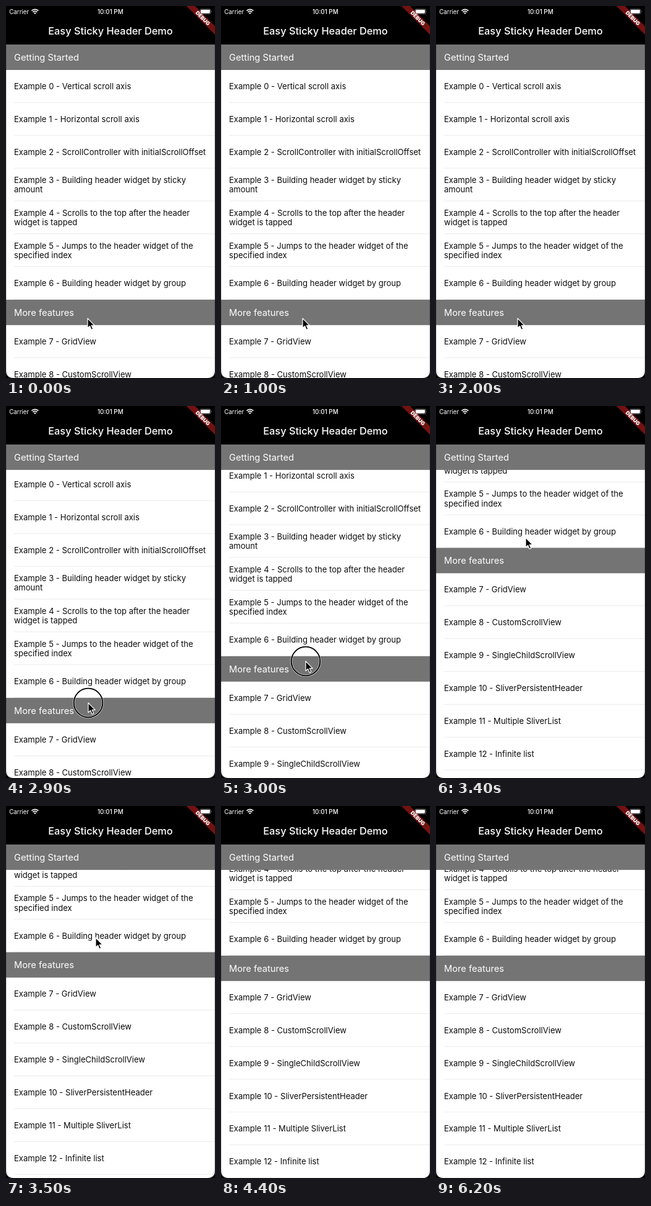
Animation of 338x599 px, one loop 6.3 s. Source, as an HTML page:

```html
<!DOCTYPE html>
<html lang="en">
<head>
<meta charset="utf-8">
<title>Easy Sticky Header Demo</title>
<style>
  html, body { margin: 0; width: 100%; height: 100%; overflow: hidden; background: #000; }
  svg { display: block; width: 338px; height: 599px; }
  text { font-family: Inter, Roboto, sans-serif; white-space: pre; }
  .item { font-size: 13.06px; fill: #0c0c0c; }
  .head { font-size: 14.7px; fill: #fff; }
  .status { font-size: 9.8px; fill: #fff; }
</style>
</head>
<body>
<svg viewBox="0 0 338 599">
  <defs>
    <clipPath id="screen"><path d="M0 0H338V586.5Q338 599 325.5 599H12.5Q0 599 0 586.5Z"/></clipPath>
  </defs>
  <rect width="338" height="599" fill="#000"/>
  <g clip-path="url(#screen)">
    <rect y="62" width="338" height="537" fill="#fff"/>
    <g id="list"></g>
    <g id="sticky"></g>
    <path d="M.3 62V599M337.6 62V599" stroke="#000" stroke-opacity=".3" stroke-width=".8"/>
    <rect width="338" height="62" fill="#000"/>
  </g>

  <text x="169" y="45.9" text-anchor="middle" font-size="16.33" font-weight="500" fill="#fff">Easy Sticky Header Demo</text>

  <g transform="translate(338 0) rotate(45)">
    <rect x="-32.7" y="22.9" width="65.4" height="9.8" fill="#731212"/>
    <text y="30.8" text-anchor="middle" font-size="8.33" font-weight="900" fill="#fff">DEBUG</text>
  </g>

  <text class="status" x="5.2" y="12.6">Carrier</text>
  <text class="status" x="168.8" y="12.6" text-anchor="middle" font-weight="500">10:01 PM</text>
  <g fill="none" stroke="#fff" stroke-width="1.6">
    <path d="M41.4 7.7Q46.9 2.9 52.4 7.7M43.4 9.9Q46.9 6.9 50.4 9.9"/>
    <path d="M45.1 11.3Q46.9 9.8 48.7 11.3L46.9 13.2Z" fill="#fff" stroke="none"/>
  </g>
  <rect x="313.6" y="4.9" width="17.4" height="8" rx="2.1" fill="none" stroke="#fff" stroke-opacity=".5" stroke-width=".8"/>
  <rect x="314.8" y="6.1" width="15" height="5.6" rx="1.1" fill="#fff"/>
  <path d="M332.1 7.5Q333.4 8.9 332.1 10.3Z" fill="#fff" fill-opacity=".6"/>

  <g id="pointer">
    <g id="ring" fill="none">
      <circle r="23.3" stroke="#fff" stroke-opacity=".6" stroke-width="3.4"/>
      <circle r="23.3" stroke="#000" stroke-width="1.8"/>
    </g>
    <path d="M0 0V15.6L3.6 12.3L6.1 18.2L8.7 17.1L6.2 11.3H11.2Z" fill="#000" stroke="#fff" stroke-width="1.2" stroke-linejoin="round"/>
  </g>
</svg>
<script>
const LOOP = 6300, STEP = 100;
const TOP = 62, HEAD_H = 40.9, ROW_H = 52.86, MAX_SCROLL = 232;

const sections = [
  ["Getting Started", [
    "Vertical scroll axis",
    "Horizontal scroll axis",
    "ScrollController with initialScrollOffset",
    "Building header widget by sticky|amount",
    "Scrolls to the top after the header|widget is tapped",
    "Jumps to the header widget of the|specified index",
    "Building header widget by group"]],
  ["More features", [
    "GridView",
    "CustomScrollView",
    "SingleChildScrollView",
    "SliverPersistentHeader",
    "Multiple SliverList",
    "Infinite list"]]
];

const $ = id => document.getElementById(id);
const list = $("list"), pointer = $("pointer"), ring = $("ring");

function add(parent, tag, attrs, text = "") {
  const node = document.createElementNS("http://www.w3.org/2000/svg", tag);
  for (const key in attrs) node.setAttribute(key, attrs[key]);
  node.textContent = text;
  parent.append(node);
}

function addHeader(parent, y, title) {
  add(parent, "rect", { x: 0, y, width: 338, height: HEAD_H, fill: "#747474" });
  add(parent, "text", { class: "head", x: 13, y: y + 26 }, title);
}

function addRow(y, label) {
  const lines = label.split("|");
  lines.forEach((line, i) => {
    const shift = (i - (lines.length - 1) / 2) * 15.5;
    add(list, "text", { class: "item", x: 13, y: y + ROW_H / 2 + 4.7 + shift }, line);
  });
  add(list, "rect", { x: 13, y: y + ROW_H - 0.8, width: 325, height: 0.8, fill: "#e6e6e6" });
}

let y = TOP, count = 0;
for (const [title, rows] of sections) {
  addHeader(list, y, title);
  y += HEAD_H;
  for (const row of rows) {
    addRow(y, `Example ${count++} - ${row}`);
    y += ROW_H;
  }
}
addHeader($("sticky"), TOP, sections[0][0]);

// time, pointer x, pointer y, scroll
const drag = [
  [2800, 132, 503, 0],
  [2900, 133, 478, 3],
  [3000, 137, 411, 70],
  [3100, 141.5, 322, 159],
  [3200, 146, 238, 247],
  [3300, 145, 214, 252],
  [3400, 145, 212, 244.5],
  [3500, 145, 212, 237.5]
];

function poseAt(t) {
  if (t <= drag[0][0]) return drag[0].slice(1);
  const i = drag.findIndex(p => p[0] >= t);
  if (i < 0) {
    const spring = 5.5 * Math.exp(-(t - 3500) / 110);
    return [145, 212, MAX_SCROLL + spring];
  }
  const a = drag[i - 1], b = drag[i], k = (t - a[0]) / (b[0] - a[0]);
  return a.slice(1).map((v, j) => v + (b[j + 1] - v) * k);
}

function draw(time) {
  const t = Math.floor(time % LOOP / STEP) * STEP;
  const [px, py, scroll] = poseAt(t);
  list.setAttribute("transform", `translate(0 ${-scroll})`);
  pointer.setAttribute("transform", `translate(${px} ${py})`);
  pointer.style.display = t < 3900 ? "" : "none";
  ring.style.display = t >= 2900 && t < 3300 ? "" : "none";
}

const start = performance.now();
function tick() {
  draw(performance.now() - start);
  requestAnimationFrame(tick);
}
tick();
</script>
</body>
</html>
```
